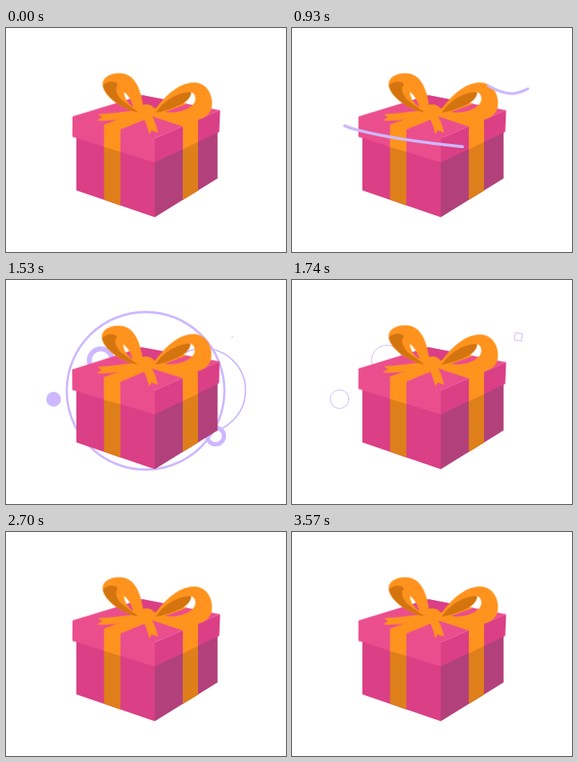
Recreate the animation shown at these times as an HTML page. Size 350 by 280 pixels, loop 3600 ms.

```html
<!DOCTYPE html>
<html lang="en">
<head>
<meta charset="utf-8">
<title>Gift box</title>
<style>
html, body { margin: 0; width: 100%; height: 100%; overflow: hidden; background: #fff; }
svg { display: block; width: 350px; height: 280px; }

.pink { fill: #eb4e8d; }
.rose { fill: #db3f86; }
.plum { fill: #b2417b; }
.gold { fill: #ff931e; }
.rust { fill: #de7f1b; }
.deep { fill: #d4740f; }

.fx { fill: none; stroke: #cdb8ff; stroke-linecap: round; animation: 3600ms linear infinite; }
.lid { transform-origin: 186px 150px; animation: rock 450ms ease-in-out infinite alternate; }
.arc { stroke-width: 3.4; animation-name: arc; }
.band { stroke-width: 3.8; animation-name: band; }
.wave { animation-name: wave; }
.halo { animation-name: halo; }
.ball { animation-name: ball; }
.dot { animation-name: dot; }
.bubble { animation-name: bubble; }
.tile { transform-origin: 283px 71px; animation-name: tile; }
.tick { stroke-width: 2.5; animation-name: tick; }

@keyframes rock {
  from { transform: rotate(.25deg); }
  to { transform: rotate(-.9deg); }
}

/* Ribbons: dash length, then distance travelled */
@keyframes arc {
  0%, 5.8% { opacity: 0; stroke-dasharray: 0 999; stroke-dashoffset: 0; }
  5.81% { opacity: 1; stroke-dasharray: 0 999; }
  11.67% { stroke-dasharray: 82 999; stroke-dashoffset: 0; }
  25.83% { stroke-dasharray: 56 999; stroke-dashoffset: -174; }
  30% { opacity: 1; stroke-dasharray: 1 999; stroke-dashoffset: -226; }
  30.01%, 100% { opacity: 0; stroke-dasharray: 0 999; stroke-dashoffset: -230; }
}
@keyframes band {
  0%, 10.8% { opacity: 0; stroke-dasharray: 0 999; stroke-dashoffset: 0; }
  10.81% { opacity: 1; stroke-dasharray: 0 999; }
  11.67% { stroke-dasharray: 10 999; stroke-dashoffset: 0; }
  25.83% { stroke-dasharray: 150 999; stroke-dashoffset: -106; stroke-width: 3.8; }
  38.33% { stroke-dasharray: 34 999; stroke-dashoffset: -292; stroke-width: 3; }
  42% { opacity: 1; stroke-dasharray: 1 999; stroke-dashoffset: -322; }
  42.01%, 100% { opacity: 0; stroke-dasharray: 0 999; stroke-dashoffset: -324; }
}

/* Bursts: a filled disc opens into a thinning ring */
@keyframes wave {
  0%, 30.8% { r: 30px; stroke-width: 0; }
  30.81% { r: 30px; stroke-width: 10px; }
  38.33% { r: 74px; stroke-width: 6px; }
  45% { r: 113px; stroke-width: 1px; }
  47.2%, 100% { r: 114px; stroke-width: 0; }
}
@keyframes halo {
  0%, 33.3% { r: 0; stroke-width: 0; }
  35% { r: 24px; stroke-width: 14px; }
  38.33% { r: 48px; stroke-width: 5px; }
  45%, 100% { r: 55px; stroke-width: 0; }
}
@keyframes ball {
  0%, 33.3% { r: 0; stroke-width: 0; }
  38.33% { r: 6px; stroke-width: 12px; }
  45.8%, 100% { r: 14px; stroke-width: 0; }
}
@keyframes dot {
  0%, 37.2% { r: 0; stroke-width: 0; }
  38.33% { r: 1.2px; stroke-width: 2.4px; }
  43% { r: 5px; stroke-width: 10px; }
  48.33% { r: 11.6px; stroke-width: 1px; }
  50.8%, 100% { r: 12px; stroke-width: 0; }
}
@keyframes bubble {
  0%, 34% { r: 0; stroke-width: 0; }
  38.33% { r: 11px; stroke-width: 10px; }
  48.33% { r: 19px; stroke-width: 1px; }
  50.8%, 100% { r: 19.5px; stroke-width: 0; }
}
@keyframes tile {
  0%, 41.6% { transform: rotate(-30deg) scale(0); stroke-width: 5px; }
  48.33% { transform: rotate(9deg) scale(1); stroke-width: 1px; }
  51.6%, 100% { transform: rotate(14deg) scale(1); stroke-width: 0; }
}
@keyframes tick {
  0%, 36.6% { opacity: 0; }
  36.61%, 40.5% { opacity: 1; }
  40.51%, 100% { opacity: 0; }
}
</style>
</head>
<body>
<svg viewBox="0 0 350 280">
  <g>
    <circle class="fx wave" cx="174.5" cy="138.5"/>
    <circle class="fx halo" cx="247" cy="138"/>
    <circle class="fx ball" cx="262" cy="195"/>
    <circle class="fx dot" cx="59.5" cy="149"/>
    <circle class="fx bubble" cx="118.5" cy="100.5"/>
    <rect class="fx tile" x="278.5" y="66.5" width="9" height="9"/>
    <path class="fx tick" d="M175 82l4 2 5-2"/>
  </g>

  <g>
    <path class="rose" d="M88 130L186 160V236.500L88 203Z"/>
    <path class="plum" d="M186 160L264.500 124V188L186 236.500Z"/>
    <path class="rust" d="M122.500 144L143 150V222L122.500 214.500Z"/>
    <path class="rust" d="M221 146L240 137V203.500L221 215Z"/>
  </g>

  <g class="lid">
    <path class="pink" d="M83 111L170 84L267.500 102.500L186 138V168L83 136.500Z"/>
    <path class="rose" d="M152 90L170 84L206 91L186 101L164 96Z"/>
    <path class="rose" d="M186 138L267.500 102.500L266.500 129.500L186 168Z"/>
    <path class="gold" d="M122.500 121L168 104L182 111L143 127V155L122.500 149Z"/>
    <path class="gold" d="M186 102L240 114V142.500L221 151.500V123L178 109Z"/>
    <path class="gold" d="M178 104L208 91L227 94.500L190 108Z"/>

    <path class="gold" d="M168 103C150 104 136 107 115 108L120 112L113 116C134 117 154 112 171 109Z"/>
    <path class="gold" d="M169 108C174 115 177 124 179 133L182 128L190 131C188 122 185 114 181 107Z"/>
    <path class="gold" fill-rule="evenodd" d="M172 104C170 82 163 59 145 57C130 55 119 63 120.500 72C122 86 145 102 168 107ZM147 80C153 84 157 92 159 99C152 95 148 88 147 80Z"/>
    <path class="deep" d="M121 72C126 66 138 66 139.500 71C135 76 138 83 144 90L166 106C145 102 123 86 121 72Z"/>
    <path class="gold" fill-rule="evenodd" d="M183 107C195 88 215 67 236 68C252 69 259 85 257 98C254 114 236 117 222 114C208 112 195 110 183 107ZM195 105C215 100 230 92 231 80C238 82 238 92 233 96C225 104 210 107 195 105Z"/>
    <path class="deep" d="M187 106C195 92 215 79 231 80C232 88 220 99 187 106Z"/>
    <ellipse class="gold" cx="175" cy="103" rx="11" ry="7.500"/>
  </g>

  <path class="fx arc" d="M94 105C108 78 130 62 157 56S215 55 245 72S285 80 295 76"/>
  <path class="fx band" d="M150 148C165 164 245 166 229 150C225 149 140 143 80 127C58 121 46 112 47 98C48 92 51 85 56 80"/>
</svg>
</body>
</html>
```
